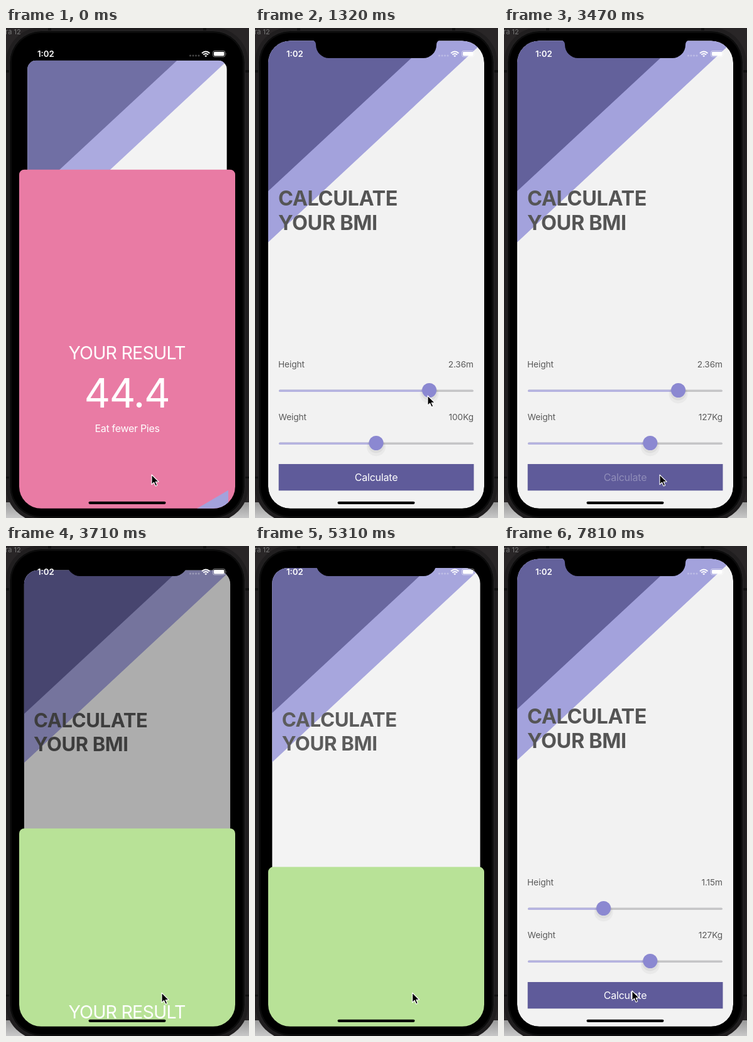
Recreate the animation shown at these times as an HTML page. Size 387 by 781 pixels, loop 8000 ms.

```html
<!DOCTYPE html>
<html lang="en">
<head>
<meta charset="utf-8">
<title>BMI calculator</title>
<style>
  html, body { margin: 0; width: 100%; height: 100%; overflow: hidden; background: #1c1b1c; }
  svg { display: block; width: 387px; height: 781px; font-family: Inter, Roboto, sans-serif; }
  .label { font-size: 13.7px; letter-spacing: -.1px; fill: #5a5a5a; }
  .title { font-size: 32.4px; font-weight: 700; letter-spacing: -.35px; fill: #555; }
  .button { font-size: 16px; letter-spacing: -.2px; }
  .end { text-anchor: end; }
  .mid { text-anchor: middle; }
</style>
</head>
<body>
<svg viewBox="0 0 387 781">
  <defs>
    <clipPath id="screen"><rect x="21" y="20.4" width="344" height="745.4" rx="35"/></clipPath>
    <clipPath id="card"><rect id="cardShape" x="21" y="20" width="344" height="746"/></clipPath>
    <linearGradient id="floor" x2="0" y2="1">
      <stop stop-color="#999"/><stop offset="1" stop-color="#c8c8c8"/>
    </linearGradient>
    <g id="thumb">
      <circle cy="6" r="15" fill="#000" opacity=".04"/>
      <circle cy="3" r="13" fill="#000" opacity=".05"/>
      <circle r="11.5" fill="#8b88d1"/>
    </g>
  </defs>

  <!-- desktop and phone body -->
  <rect width="387" height="781" fill="#292627"/>
  <rect y="756" width="387" height="25" fill="url(#floor)"/>
  <rect x="0" y="-1" width="386" height="788" rx="56" fill="#201e1f"/>
  <path d="M67 0h5v10h-5zM314 0h5v10h-5zM0 67h10v4H0zM377 67h10v4h-10zM0 715h10v3H0zM377 715h10v3h-10z" fill="#111"/>
  <text x="-1" y="10" font-size="11" fill="#777">ra 12</text>
  <rect x="5.5" y="4.5" width="375" height="777" rx="51" fill="#0c0c0c" stroke="#252425"/>
  <rect x="9" y="8" width="368" height="770" rx="47"/>

  <g clip-path="url(#screen)">
    <g id="layer"><g clip-path="url(#card)">
      <rect x="21" y="20" width="344" height="746" fill="#f2f2f2"/>
      <path d="M21 20H366L21 341.5z" fill="#a3a2dc"/>
      <path d="M21 20H279L21 260z" fill="#63619b"/>
      <text class="title" x="37" y="282.5">CALCULATE</text>
      <text class="title" x="37" y="322">YOUR BMI</text>
      <text class="label" x="37" y="541">Height</text>
      <text class="label end" x="348" y="541" id="heightText"></text>
      <text class="label" x="37.5" y="625">Weight</text>
      <text class="label end" x="348" y="625" id="weightText"></text>
      <g fill="#c5c5c7">
        <rect x="38" y="576.5" width="310" height="3.4" rx="1.7"/>
        <rect x="38" y="660.5" width="310" height="3.4" rx="1.7"/>
      </g>
      <g fill="#b5b3e0">
        <rect id="heightFill" x="38" y="576.5" height="3.4" rx="1.7"/>
        <rect id="weightFill" x="38" y="660.5" height="3.4" rx="1.7"/>
      </g>
      <use href="#thumb" id="heightThumb"/>
      <use href="#thumb" id="weightThumb"/>
      <rect x="37.7" y="695" width="310.8" height="42.3" fill="#5f5b9a"/>
      <text class="button mid" x="193" y="722" fill="#fff" id="calculate">Calculate</text>
      <rect id="shade" x="21" y="20" width="344" height="746"/>
    </g></g>

    <g id="sheet">
      <rect id="sheetFill" x="21" y="69" width="344" height="760" rx="8"/>
      <path d="M354 580V766H36z" fill="#a3a2dc"/>
      <path d="M354 643V766H143z" fill="#63619b"/>
      <g fill="#fff" class="mid">
        <text x="192.6" y="371.5" font-size="28.6" letter-spacing="-.8">YOUR RESULT</text>
        <text x="192.4" y="448.5" font-size="64.6" letter-spacing="-1.5" id="score"></text>
        <text x="193" y="487" font-size="16" letter-spacing="-.3" id="advice"></text>
      </g>
      <rect x="37.7" y="695" width="310.8" height="42.3" fill="#fff"/>
      <text class="button mid" x="193" y="722" fill="#8684d2" id="recalculate">RECALCULATE</text>
    </g>
  </g>

  <!-- notch, status bar, home indicator -->
  <path d="M90 19q7 1 7 8a21 21 0 0 0 21 21H268a21 21 0 0 0 21-21q0-7 7-8z"/>
  <text x="50" y="46" font-size="13.2" font-weight="600" fill="#fff">1:02</text>
  <g fill="#fff" opacity=".28">
    <circle cx="293.5" cy="44" r="1.5"/><circle cx="298" cy="44" r="1.5"/>
    <circle cx="302.5" cy="44" r="1.5"/><circle cx="307" cy="44" r="1.5"/>
  </g>
  <path d="M312 40.2q6.2-5.4 12.4 0M314.3 42.6q3.9-3.3 7.8 0" fill="none" stroke="#fff" stroke-width="2"/>
  <path d="M318.2 46.3l-2-2.1q2-1.6 4 0z" fill="#fff"/>
  <rect x="329.5" y="36.5" width="19.5" height="9.4" rx="2.6" fill="none" stroke="#fff" stroke-opacity=".5"/>
  <rect x="331" y="38" width="16.5" height="6.4" rx="1.3" fill="#fff"/>
  <path d="M350 39.7q1.3 1.5 0 3z" fill="#fff" opacity=".6"/>
  <rect x="131.5" y="754.7" width="123" height="4.2" rx="2.1"/>

  <path id="cursor" d="M0 0V15.6L3.6 12.2L6.1 18L8.7 16.9L6.2 11.2H11.1z"
        fill="#000" stroke="#fff" stroke-width="1.1" stroke-linejoin="round"/>
</svg>
<script>
  const LOOP = 8000, SPRING = 0.0186;
  const el = Object.fromEntries([...document.querySelectorAll("[id]")].map(e => [e.id, e]));
  const set = (node, attrs) => Object.entries(attrs).forEach(([k, v]) => node.setAttribute(k, v));
  const smooth = u => u * u * (3 - 2 * u);
  const linear = u => u;

  // Keys are [time, value, ...values]; returns the interpolated values.
  function track(keys, t, ease = smooth) {
    const next = keys.findIndex(k => k[0] > t);
    if (next === 0) return keys[0].slice(1);
    if (next < 0) return keys[keys.length - 1].slice(1);
    const a = keys[next - 1], b = keys[next];
    const u = ease((t - a[0]) / (b[0] - a[0]));
    return a.slice(1).map((v, i) => v + (b[i + 1] - v) * u);
  }

  const heightKeys = [[890, 1.5], [1320, 2.36], [6320, 2.36], [6770, 1.15]];
  const weightKeys = [[2040, 100], [2550, 120], [2840, 127]];
  const cursorKeys = [
    [40, 232, 712], [350, 208, 606], [820, 191, 586], [890, 192, 586],
    [1320, 275, 586], [1560, 275, 586], [1880, 190, 669], [2040, 190, 669],
    [2550, 219, 669], [2840, 229, 669], [3090, 229, 669], [3330, 248, 712],
    [4540, 248, 713], [4860, 249, 720], [5220, 249, 720], [5860, 278, 575],
    [6320, 278, 575], [6770, 162, 575], [7310, 162, 575], [7460, 199, 657],
    [7640, 199, 657], [7810, 204, 709]
  ];

  // Critically damped spring: 1 at the start, falling to 0.
  function settle(ms) {
    const x = SPRING * Math.max(0, ms);
    return (1 + x) * Math.exp(-x);
  }

  function slider(name, value, max, y, label) {
    const x = 193 + (value / max - 0.5) * 295;
    set(el[name + "Thumb"], { x, y });
    set(el[name + "Fill"], { width: x - 38 });
    el[name + "Text"].textContent = label;
  }

  function draw(t) {
    const [height] = track(heightKeys, t);
    const [weight] = track(weightKeys, t, linear);
    slider("height", height, 3, 577.5, +height.toFixed(2) + "m");
    slider("weight", weight, 200, 661.5, Math.round(weight) + "Kg");

    const first = t < 3000, presenting = t >= 3000 && t < 5195;
    const open = first ? settle(Math.max(t, 10) + 38)
      : presenting ? 1 - settle(t - 3628.6)
      : settle(t - 5195);
    const scale = 1 - 0.099 * open;
    set(el.layer, { transform: `translate(193 ${20 + 41 * open}) scale(${scale}) translate(-193 -20)` });
    set(el.cardShape, { rx: (35 - 27 * open) / scale });
    set(el.shade, {
      fill: presenting ? "#000" : "#fff",
      opacity: presenting ? 0.285 * Math.min(1, open / 0.4) : 0.11 * open
    });

    set(el.sheet, { transform: `translate(0 ${697 * (1 - open)})` });
    set(el.sheetFill, { fill: first ? "#e97ba4" : "#b8e297" });
    el.score.textContent = first ? "44.4" : "22.9";
    el.advice.textContent = first ? "Eat fewer Pies" : "Fit as a Fiddle";

    set(el.calculate, { opacity: t >= 3470 && t < 3640 ? 0.3 : 1 });
    set(el.recalculate, { opacity: t >= 5040 && t < 5230 ? 0.3 : 1 });

    const [x, y] = track(cursorKeys, t, t < 350 ? linear : smooth);
    set(el.cursor, { transform: `translate(${x} ${y})` });
  }

  const start = performance.now();
  function tick() {
    draw((performance.now() - start) % LOOP);
    requestAnimationFrame(tick);
  }
  draw(0);
  requestAnimationFrame(tick);
</script>
</body>
</html>
```
